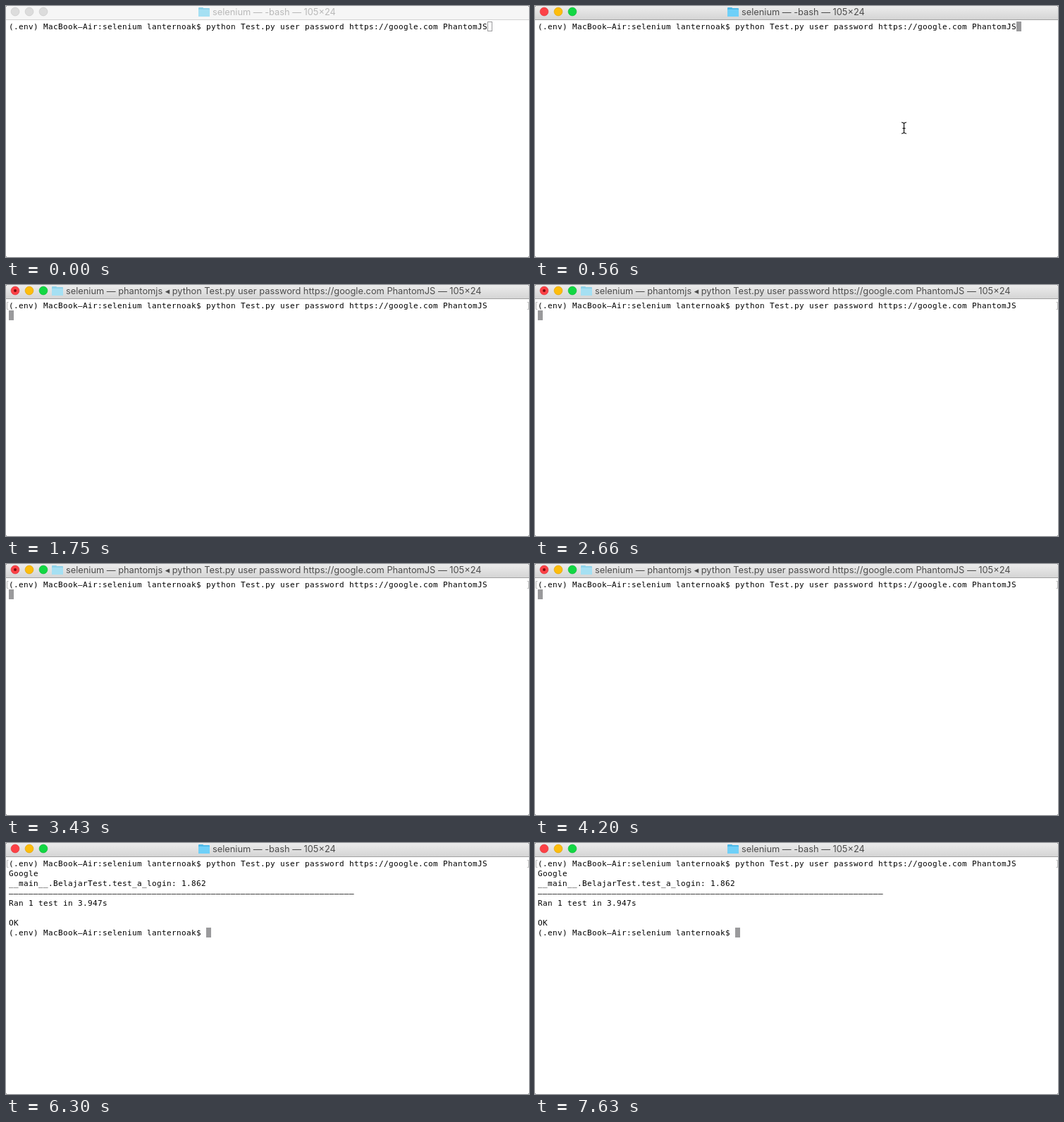
Write an HTML page with a canvas that moves like this. It is 742 px wide and 356 px high and loops after 7.7 s.

```html
<!DOCTYPE html>
<html lang="en">
<head>
<meta charset="utf-8">
<title>Terminal session</title>
<style>
html, body { margin: 0; width: 742px; height: 356px; overflow: hidden; background: #fff; }
canvas { display: block; }
</style>
</head>
<body>
<canvas id="stage" width="742" height="356"></canvas>
<script>
const ctx = document.getElementById('stage').getContext('2d');
const W = 742, H = 356, LOOP = 7700;
const COL = 7, ROW = 14, LEFT = 4, TOP = 22, BAR = 19;

const PROMPT = '(.env) MacBook-Air:selenium lanternoak$ ';
const COMMAND = 'python Test.py user password https://google.com PhantomJS';
const OUTPUT = [
  'Google',
  '__main__.BelajarTest.test_a_login: 1.862',
  '-'.repeat(70),
  'Ran 1 test in 3.947s',
  '',
  'OK'
];
const TITLES = {
  shell: 'selenium — -bash — 105×24',
  python: `selenium — ${COMMAND} — 105×24`,
  phantom: `selenium — phantomjs ◂ ${COMMAND} — 105×24`
};
const TIME = {
  pointerIn: 70, pointerRest: 280, focus: 490, enter: 1190, python: 1260,
  phantom: 1610, firstOutput: 5810, result: 5880, done: 5950
};

function disc(x, y, r, fill, edge) {
  ctx.beginPath();
  ctx.arc(x, y, r, 0, Math.PI * 2);
  ctx.fillStyle = fill;
  ctx.fill();
  if (edge) {
    ctx.strokeStyle = edge;
    ctx.lineWidth = 0.7;
    ctx.stroke();
  }
}

function polyline(points, color, width) {
  ctx.beginPath();
  points.forEach(([x, y]) => ctx.lineTo(x, y));
  ctx.strokeStyle = color;
  ctx.lineWidth = width;
  ctx.stroke();
}

function folder(x, pale) {
  ctx.fillStyle = pale ? '#8fd3ea' : '#4fb9e8';
  ctx.beginPath();
  ctx.roundRect(x, 2, 7, 5, 1);
  ctx.roundRect(x, 3, 16, 12, 1);
  ctx.fill();
  ctx.fillStyle = pale ? '#a5e0f3' : '#6fd0f8';
  ctx.beginPath();
  ctx.roundRect(x, 5, 16, 10, 1);
  ctx.fill();
}

function titleBar(title, active, running) {
  const shade = ctx.createLinearGradient(0, 0, 0, BAR);
  shade.addColorStop(0, active ? '#ececec' : '#f6f6f6');
  shade.addColorStop(1, active ? '#d5d5d5' : '#f6f6f6');
  ctx.fillStyle = shade;
  ctx.fillRect(0, 0, W, BAR);
  ctx.fillStyle = active ? '#a2a2a2' : '#d2d2d2';
  ctx.fillRect(0, BAR, W, 1);

  const lights = active
    ? [['#fc4146', '#e0363b'], ['#fdbd0c', '#e0a30c'], ['#12d743', '#10b838']]
    : Array(3).fill(['#dcdcdc', '#cbcbcb']);
  lights.forEach(([fill, edge], i) => disc(13 + i * 20, 8, 5.9, fill, edge));
  if (running) disc(13, 8, 2, '#7c0a0c');

  ctx.font = '12.8px Inter, "DejaVu Sans", sans-serif';
  ctx.letterSpacing = '0px';
  const x = Math.round(380 - ctx.measureText(title).width / 2);
  folder(x - 20, !active || running);
  ctx.fillStyle = active ? '#4c4c4c' : '#b9b9b9';
  ctx.fillText(title, x, 13);
}

function textRow(row, text) {
  ctx.font = '11px "DejaVu Sans Mono", monospace';
  ctx.letterSpacing = '0.378px';
  ctx.fillStyle = '#000';
  // the terminal face has wide hyphens
  ctx.fillText(text.replace(/-/g, '–'), LEFT, TOP + row * ROW + 11);
}

function caret(col, row, active) {
  const x = LEFT + col * COL, y = TOP + row * ROW;
  if (active) {
    ctx.fillStyle = '#9a9a9c';
    ctx.fillRect(x, y, COL, ROW);
  } else {
    ctx.strokeStyle = '#9a9a9c';
    ctx.lineWidth = 1;
    ctx.strokeRect(x + 0.5, y + 0.5, COL - 1, ROW - 1);
  }
}

function promptMarks() {
  polyline([[3.5, 24.5], [1.5, 24.5], [1.5, 34.5], [3.5, 34.5]], '#bcbcbc', 1);
  polyline([[739.5, 24.5], [741.5, 24.5], [741.5, 34.5], [739.5, 34.5]], '#bcbcbc', 1);
}

function textPointer(x, y) {
  for (const [color, width] of [['#fff', 3], ['#111', 1.2]]) {
    polyline([[x, y - 7], [x, y + 7]], color, width);
    polyline([[x - 2, y + 0.5], [x + 2, y + 0.5]], color, width);
    for (const s of [-1, 1]) {
      polyline([[x - 3.5, y + s * 8], [x - 1.5, y + s * 7.5], [x, y + s * 6.5],
        [x + 1.5, y + s * 7.5], [x + 3.5, y + s * 8]], color, width);
    }
  }
}

function pointer(t) {
  if (t < TIME.pointerIn || t >= TIME.enter) return;
  const p = Math.min(1, (t - TIME.pointerIn) / (TIME.pointerRest - TIME.pointerIn));
  const away = (1 - p) ** 2;
  textPointer(523.5 + 77 * away, 173 + 157 * away);
}

function corners() {
  ctx.fillStyle = '#8c8c8c';
  for (const x of [0, W - 1]) {
    for (const y of [0, H - 1]) ctx.fillRect(x, y, 1, 1);
  }
}

function draw(t) {
  const active = t >= TIME.focus;
  const running = t >= TIME.python && t < TIME.done;
  const title = !running ? TITLES.shell
    : t >= TIME.phantom && t < TIME.result ? TITLES.phantom : TITLES.python;

  ctx.fillStyle = '#fff';
  ctx.fillRect(0, 0, W, H);
  titleBar(title, active, running);
  textRow(0, PROMPT + COMMAND);

  if (t < TIME.enter) {
    caret(PROMPT.length + COMMAND.length, 0, active);
  } else {
    const count = t < TIME.firstOutput ? 0 : t < TIME.result ? 1 : OUTPUT.length;
    promptMarks();
    OUTPUT.slice(0, count).forEach((line, i) => textRow(i + 1, line));
    const done = t >= TIME.done;
    if (done) textRow(count + 1, PROMPT);
    caret(done ? PROMPT.length : 0, count + 1, true);
  }
  pointer(t);
  corners();
}

const start = performance.now();
function tick() {
  draw((performance.now() - start) % LOOP);
  requestAnimationFrame(tick);
}
tick();
</script>
</body>
</html>
```
